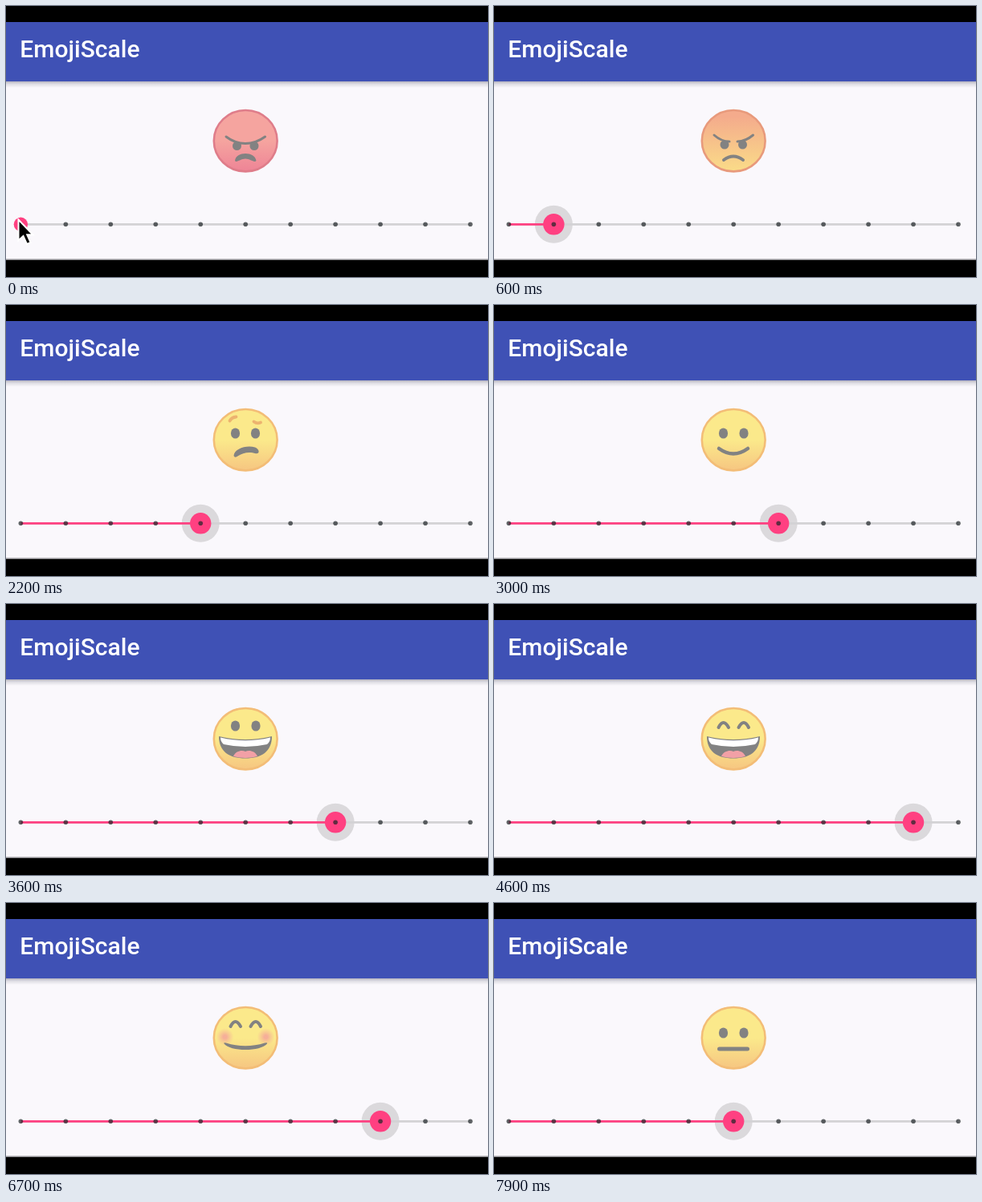
Animation, 600 px wide and 338 px high, one loop 8 s. Source, as an HTML page:

```html
<!DOCTYPE html>
<html lang="en">
<head>
<meta charset="utf-8">
<title>EmojiScale</title>
<style>
  html, body { margin: 0; width: 100%; height: 100%; overflow: hidden; background: #000; }
  svg { display: block; width: 100vw; height: 100vh; }
  .title { font: 500 30px Roboto, sans-serif; fill: #fff; }
  .ink { fill: #828282; }
  .line { fill: none; stroke: #828282; stroke-linecap: round; stroke-linejoin: round; }
  .brow { fill: none; stroke-width: 3.8; stroke-linecap: round; }
  .face { display: none; }
  .face.on { display: inline; }
</style>
</head>
<body>
<svg viewBox="0 0 600 338" preserveAspectRatio="none">
  <defs>
    <linearGradient id="shade" x2="0" y2="1">
      <stop stop-color="#b4b3bf"/><stop offset=".4" stop-color="#dedde3"/><stop offset="1" stop-color="#faf8fc"/>
    </linearGradient>
    <linearGradient id="red" x2="0" y2="1">
      <stop offset=".5" stop-color="#f5a49f"/><stop offset="1" stop-color="#ee8496"/>
    </linearGradient>
    <linearGradient id="orange" x2="0" y2="1">
      <stop offset=".1" stop-color="#f4ab8c"/><stop offset="1" stop-color="#fadc88"/>
    </linearGradient>
    <linearGradient id="amber" x2="0" y2="1">
      <stop offset=".3" stop-color="#f5c987"/><stop offset="1" stop-color="#fdee8b"/>
    </linearGradient>
    <linearGradient id="yellow" x2="0" y2="1">
      <stop offset=".5" stop-color="#fbe98b"/><stop offset="1" stop-color="#f6c681"/>
    </linearGradient>
    <radialGradient id="blush">
      <stop offset=".2" stop-color="#f5a99a" stop-opacity=".9"/><stop offset="1" stop-color="#f5b695" stop-opacity="0"/>
    </radialGradient>
    <radialGradient id="love">
      <stop offset=".4" stop-color="#e57bbb"/><stop offset="1" stop-color="#d967a8"/>
    </radialGradient>
    <ellipse id="eye" rx="5.6" ry="6.6" class="ink"/>
    <path id="heart" fill="url(#love)" d="M0 17C-6 11-17 5-17-5C-17-16-4-18 0-8C4-18 17-16 17-5C17 5 6 11 0 17Z"/>
    <g id="arcs" class="line" stroke-width="4"><path d="M279.500 154Q285.500 142 292 154M304.500 154Q311 142 317 154"/></g>
    <g id="cheeks" fill="url(#blush)"><circle cx="272.500" cy="167" r="11"/><circle cx="323.500" cy="167" r="11"/></g>
    <g id="grin">
      <path class="ink" d="M265 165Q298 173 331 165C331 184 318 192.500 298 192.500C278 192.500 265 184 265 165Z"/>
      <path fill="#fff" d="M267 166.500Q298 174 329 166.500Q329 172 325 175Q298 181 271 175Q267 172 267 166.500Z"/>
      <path fill="#f2a0a6" d="M283 190C286 183 294 182 298 184C302 182 310 183 313 190Q298 194 283 190Z"/>
    </g>
  </defs>

  <rect y="20" width="600" height="297" fill="#faf8fc"/>
  <rect y="94" width="600" height="8" fill="url(#shade)"/>
  <rect y="20" width="600" height="74" fill="#3f51b5"/>
  <rect y="315.500" width="600" height="1.500" fill="#8e8d91"/>
  <text class="title" x="17.300" y="64.300">EmojiScale</text>

  <g id="disc" stroke-width="2.600"><ellipse cx="298.200" cy="168.200" rx="39.400" ry="38.200"/></g>

  <g class="face" data-skin="red">
    <path class="line" stroke-width="3" d="M274 163Q285 171.500 298 171.500Q311 171.500 322.500 163"/>
    <circle class="ink" cx="287.500" cy="174.500" r="5.500"/><circle class="ink" cx="309" cy="174.500" r="5.500"/>
    <path class="ink" d="M285 193C286 181 310 181 311.500 193C309 196 304 190.500 298 190.500C292 190.500 287 196 285 193Z"/>
  </g>
  <g class="face" data-skin="orange">
    <path class="line" stroke-width="3" d="M274 161Q283 169 293 169M303 169Q313 169 322.500 161"/>
    <circle class="ink" cx="287" cy="173" r="5.500"/><circle class="ink" cx="309.500" cy="173" r="5.500"/>
    <path class="line" stroke-width="4" d="M286 192Q298 183 310 192"/>
  </g>
  <g class="face" data-skin="amber">
    <path class="brow" stroke="#bd9575" d="M275 152Q278 147 285 147M311 147Q319 147 322 152"/>
    <use href="#eye" x="285.500" y="163"/><use href="#eye" x="310.500" y="163"/>
    <path class="line" stroke-width="5" d="M286 186.500Q296 179 308 184"/>
    <path fill="#8c9df2" d="M313.500 169C309 178 305 184 305 190.500C305 202 321.500 202 321.500 190.500C321.500 184 317 178 313.500 169Z"/>
    <path fill="#a9b6fb" d="M313 175C310 182 307 186 307.500 191C308 198 317 197 317 190C317 185 314 181 313 175Z"/>
  </g>
  <g class="face" data-skin="yellow">
    <use href="#eye" x="285.500" y="161"/><use href="#eye" x="310.500" y="161"/>
    <path class="line" stroke-width="4.500" d="M284 187Q298 176 312 187"/>
  </g>
  <g class="face" data-skin="yellow">
    <path class="brow" stroke="#edb36f" d="M278.500 144.500Q281 140 286.500 139.500M308.500 145.500Q312.500 148.500 317 146.500"/>
    <use href="#eye" x="285.500" y="160"/><use href="#eye" x="310.500" y="160"/>
    <path class="ink" d="M283.500 188C284 179 300 174 310 177.500C316 180 316 186 311 185.300C302 182.500 295 184.500 288 188.800Q284.500 191 283.500 188Z"/>
  </g>
  <g class="face" data-skin="yellow">
    <use href="#eye" x="285.500" y="162"/><use href="#eye" x="311" y="162"/>
    <path class="line" stroke-width="5" d="M280.500 182H315.500"/>
  </g>
  <g class="face" data-skin="yellow">
    <use href="#eye" x="285.500" y="160"/><use href="#eye" x="311" y="160"/>
    <path class="line" stroke-width="4.500" d="M280 179Q298 192 316 179"/>
  </g>
  <g class="face" data-skin="yellow">
    <use href="#eye" x="285.500" y="152"/><use href="#eye" x="311" y="152"/>
    <use href="#grin"/>
  </g>
  <g class="face" data-skin="yellow">
    <use href="#cheeks"/><use href="#arcs"/>
    <path class="ink" d="M271.500 175.500Q270.500 173.500 274 174.500Q298 182 322 174.500Q326 173.500 325 175.500C317 185.500 279 185.500 271.500 175.500Z"/>
  </g>
  <g class="face" data-skin="yellow">
    <use href="#arcs"/><use href="#grin"/>
  </g>
  <g class="face" data-skin="yellow">
    <use href="#cheeks" y="6"/>
    <use href="#heart" transform="translate(278.500 157.500) rotate(-14)"/>
    <use href="#heart" transform="translate(317.800 157.500) rotate(14)"/>
    <path class="ink" d="M284 182C285 177 291 181 298 181C305 181 311 177 312.300 182C313 198 283.500 198 284 182Z"/>
  </g>

  <circle id="halo" cy="272.300" r="23.500" fill="#dbd9dc"/>
  <path d="M18.500 272.300H578" stroke="#d3d2d5" stroke-width="2.800"/>
  <path id="bar" stroke="#ff4081" stroke-width="2.800"/>
  <circle id="thumb" cy="272.300" fill="#ff4081"/>
  <g id="dots" fill="#1e2426" fill-opacity=".7"></g>
  <path id="cursor" d="M15.500 266.500V292.500L21.500 287L26 297L30.700 295L26.300 285.300H33.500Z" stroke="#fff" stroke-width="2"/>
</svg>
<script>
  const $ = id => document.getElementById(id);
  const LOOP = 8000, UP = 10;
  // times at which the thumb snaps to the next stop: up to the end, then back
  const snaps = [500, 1000, 1500, 2000, 2500, 2950, 3450, 4000, 4600, 5150, 5800, 6350, 6900, 7400, 7900];
  const borders = { red: '#df7d8a', orange: '#e89a7c', amber: '#edb574', yellow: '#f3bd77' };
  const faces = [...document.querySelectorAll('.face')];
  const stopX = i => 18.4 + 55.96 * i;
  const ramp = (t, from, to) => Math.min(1, Math.max(0, (t - from) / (to - from)));
  const set = (el, attrs) => { for (const k in attrs) el.setAttribute(k, attrs[k]); };

  for (let i = 0; i <= UP; i++) {
    const dot = document.createElementNS('http://www.w3.org/2000/svg', 'circle');
    set(dot, { cx: stopX(i), cy: 272.2, r: 2.8 });
    $('dots').append(dot);
  }

  function draw(now) {
    const t = now % LOOP;
    const count = snaps.filter(s => t >= s).length;
    const stop = count <= UP ? count : 2 * UP - count;
    const x = stopX(stop);
    const skin = faces[stop].dataset.skin;

    faces.forEach((f, i) => f.classList.toggle('on', i === stop));
    set($('disc'), { fill: `url(#${skin})`, stroke: borders[skin] });
    set($('thumb'), { cx: x, r: 8.7 + 4.5 * ramp(t, 200, 400) });
    set($('halo'), { cx: x, opacity: ramp(t, 450, 600) });
    set($('bar'), { d: `M18.4 272.3H${x}` });
    set($('cursor'), { opacity: t < 200 ? 1 : 0 });
    requestAnimationFrame(draw);
  }
  draw(0);
</script>
</body>
</html>
```
